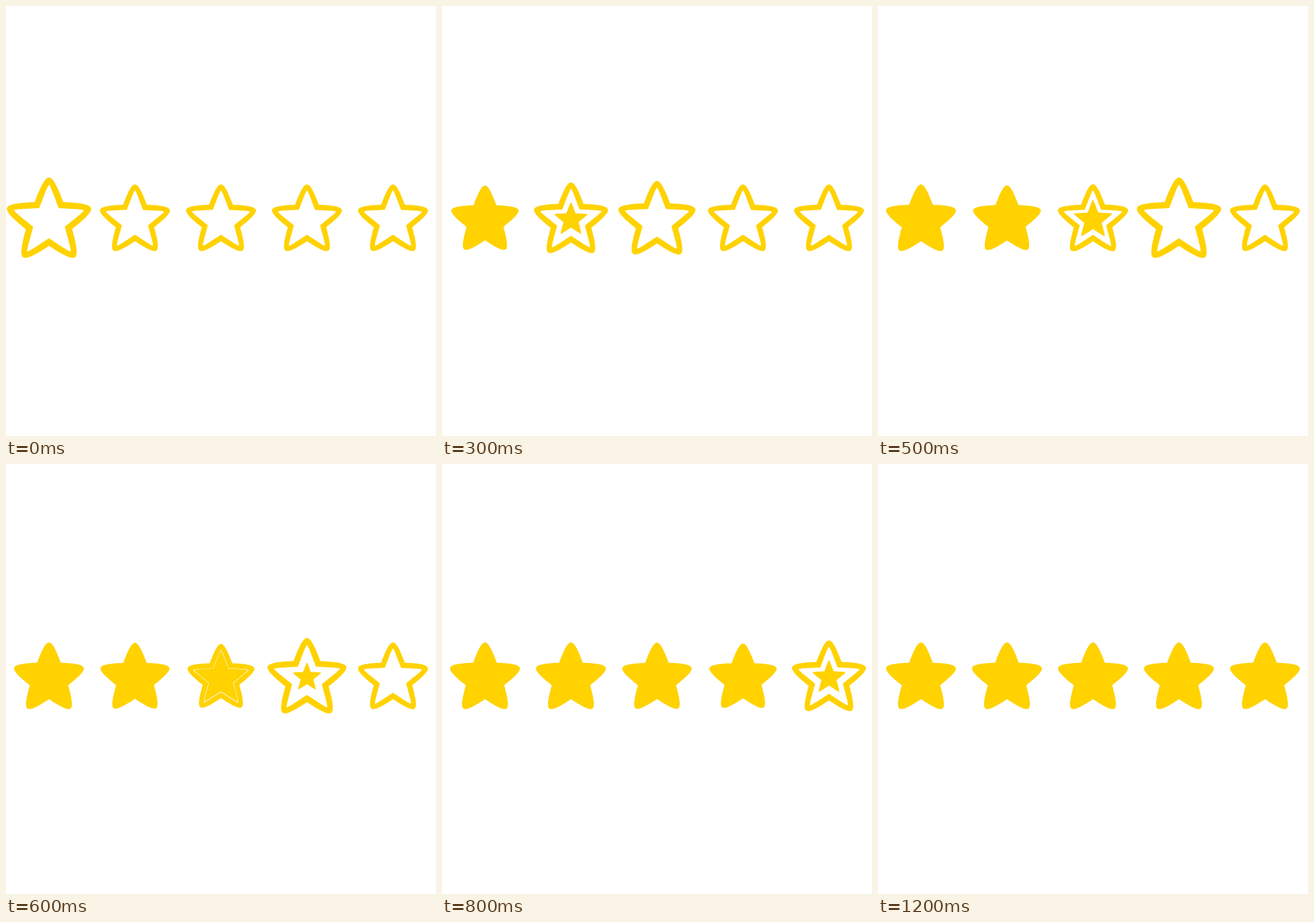
These frames come from a looping animation (640x640 px, 2000 ms). An HTML page with a canvas:

```html
<!DOCTYPE html>
<html lang="en">
<head>
<meta charset="utf-8">
<title>Star rating</title>
<style>
  html, body { margin: 0; width: 100%; height: 100%; overflow: hidden; background: #fff; }
  canvas { display: block; width: 640px; height: 640px; }
</style>
</head>
<body>
<canvas id="stage" width="640" height="640"></canvas>
<script>
const ctx = document.getElementById('stage').getContext('2d');
const COLOR = '#ffd200';
const LOOP = 2000, STEP = 100, STAGGER = 500 / 3;
const COUNT = 5, GAP = 128, PIVOT_Y = 315.5, OFFSET_Y = 4.5;
const PEAK = 1.307, DIP = 0.95;

// One tip is a curve from the notch to the point, then its mirror; five turns make the star
function makeStar(notch, c1, c2, tip) {
  const path = new Path2D();
  for (let i = 0; i < 5; i++) {
    const a = i * Math.PI * 2 / 5, c = Math.cos(a), s = Math.sin(a);
    const at = ([x, y], side) => [side * x * c - y * s, side * x * s + y * c + OFFSET_Y];
    if (i === 0) path.moveTo(...at(notch, -1));
    path.bezierCurveTo(...at(c1, -1), ...at(c2, -1), ...at(tip, 1));
    path.bezierCurveTo(...at(c2, 1), ...at(c1, 1), ...at(notch, 1));
  }
  path.closePath();
  return path;
}

const star = makeStar([17.6, -24.3], [11.5, -40.5], [5.5, -54.5], [0, -54.5]);
const hole = makeStar([12.1, -16.6], [7.5, -28], [2.5, -43], [0, -45.5]);
const ring = new Path2D(star);
ring.addPath(hole);

const progress = (t, from, to) => Math.min(1, Math.max(0, (t - from) / (to - from)));

// Swell, fall back a little too far, then settle
function sizeAt(t) {
  if (t < 33) return 1 + (PEAK - 1) * progress(t, -67, 33);
  if (t < 233) return DIP + (PEAK - DIP) * (1 - progress(t, 33, 233)) ** 1.7;
  return DIP + (1 - DIP) * progress(t, 233, 500);
}

const fillAt = t => t < 50 ? 0 : Math.min(1, 0.226 + 0.0026 * t);

function paint(path, x, scale) {
  ctx.save();
  ctx.translate(x, PIVOT_Y);
  ctx.scale(scale, scale);
  ctx.fill(path, 'evenodd');
  ctx.restore();
}

function drawStar(x, t) {
  const size = sizeAt(t), fill = fillAt(t);
  paint(fill < 1 ? ring : star, x, size);
  if (fill > 0 && fill < 1) paint(hole, x, fill);
}

function render(time) {
  const t = Math.floor((time % LOOP) / STEP) * STEP;
  ctx.fillStyle = '#fff';
  ctx.fillRect(0, 0, 640, 640);
  ctx.fillStyle = COLOR;
  for (let i = 0; i < COUNT; i++) drawStar(GAP * (i + 0.5), t - i * STAGGER);
}

const start = performance.now();
function tick() {
  render(performance.now() - start);
  requestAnimationFrame(tick);
}
tick();
</script>
</body>
</html>
```
